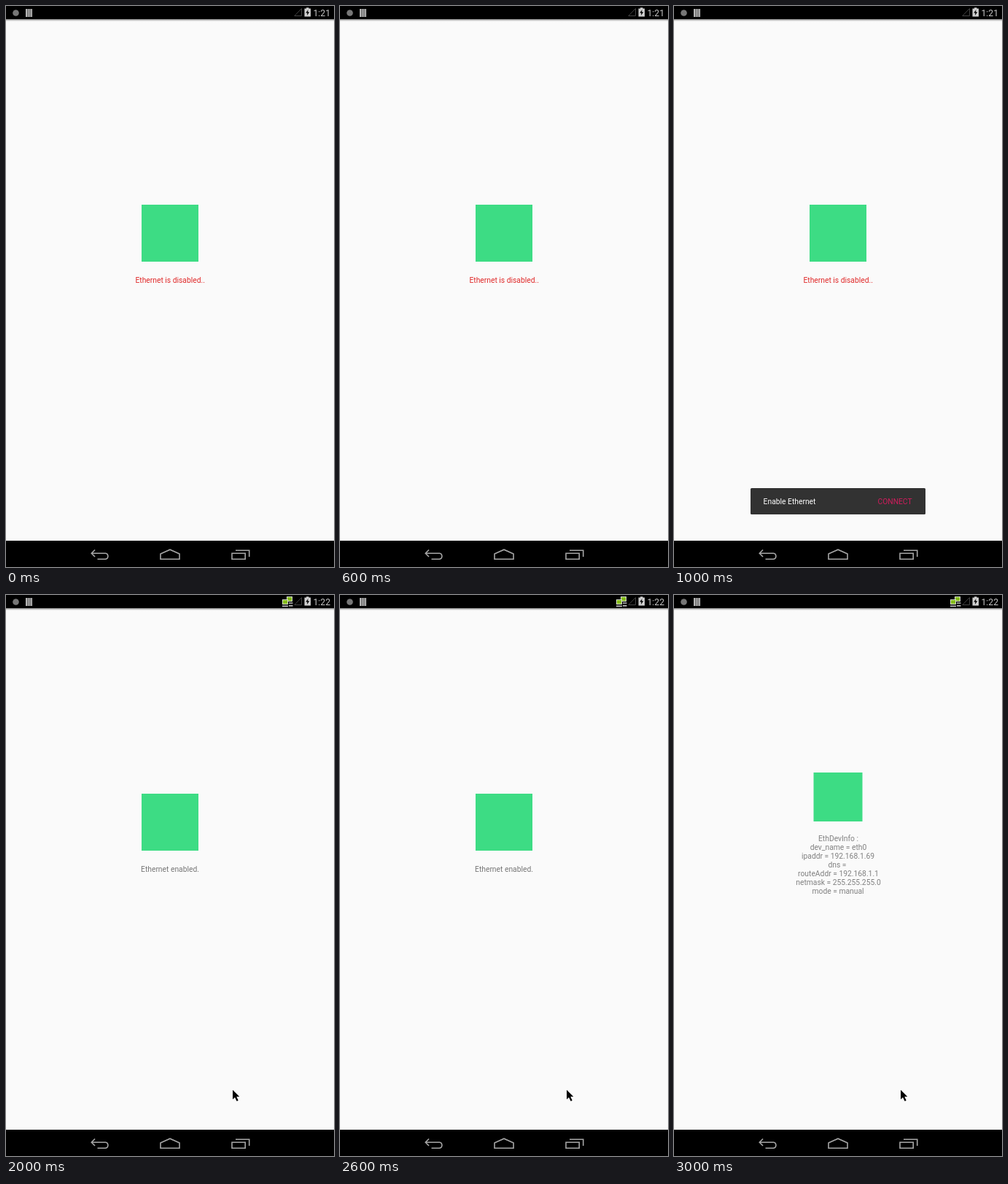
Write an HTML page that moves like this. It is 450 px wide and 768 px high and loops after 4 s.

```html
<!DOCTYPE html>
<html lang="en">
<head>
<meta charset="utf-8">
<title>Ethernet setup</title>
<style>
html, body { margin: 0; width: 100%; height: 100%; overflow: hidden; background: #fafafa; }
svg { display: block; }
text { font-family: Roboto, "Noto Sans", sans-serif; font-size: 10.3px; }
.mid { text-anchor: middle; }
.step { visibility: hidden; animation: 4s step-end infinite; }
.off { animation-name: off; }
.early { animation-name: early; }
.ask { animation-name: ask; }
.on { animation-name: on; }
.late { animation-name: late; }
.info { animation-name: info; }
.logo { animation: logo 4s step-end infinite; }
@keyframes off { 0% { visibility: visible; } 50%, 100% { visibility: hidden; } }
@keyframes early { 0% { visibility: visible; } 75%, 100% { visibility: hidden; } }
@keyframes ask { 0% { visibility: hidden; } 25% { visibility: visible; } 50%, 100% { visibility: hidden; } }
@keyframes on { 0% { visibility: hidden; } 50% { visibility: visible; } 75%, 100% { visibility: hidden; } }
@keyframes late { 0% { visibility: hidden; } 50%, 100% { visibility: visible; } }
@keyframes info { 0% { visibility: hidden; } 75%, 100% { visibility: visible; } }
</style>
</head>
<body>
<svg width="450" height="768" viewBox="0 0 450 768">
  <defs>
    <linearGradient id="shade" x2="0" y2="1">
      <stop stop-color="#8c8c8c"/>
      <stop offset="1" stop-color="#fafafa"/>
    </linearGradient>
  </defs>
  <rect width="450" height="768" fill="#fafafa"/>
  <rect y="18" width="450" height="3" fill="url(#shade)"/>

  <!-- status bar -->
  <rect width="450" height="18" fill="#000"/>
  <circle cx="13.5" cy="9.5" r="4.3" fill="#777"/>
  <rect x="27" y="4" width="9" height="11" fill="#b9b9b9"/>
  <path d="M29.5 4V15M31.7 4V15M33.9 4V15" stroke="#333" stroke-width=".7"/>
  <path d="M405.5 3.5V13.5H395.8Z" fill="none" stroke="#444"/>
  <path d="M409.5 3.5H412V2.3H415.5V3.5H418V14.5H409.5Z" fill="#cfcfcf"/>
  <path d="M414.5 5L411.2 9.6H413.4L412.9 13L416.3 8.2H414Z" fill="#000"/>
  <g class="step late">
    <rect x="385.5" y="2.5" width="7" height="6" fill="#86bd1c" stroke="#d4dcc8"/>
    <path d="M388 11H393.5" stroke="#ccc" stroke-width="1.4"/>
    <rect x="379.5" y="6.5" width="7" height="6" fill="#86bd1c" stroke="#d4dcc8"/>
    <path d="M379 15.2H387M388 14.8H393.5" stroke="#ccc" stroke-width="1.5"/>
  </g>
  <g fill="#c4c4c4">
    <text class="step off" x="421.5" y="14" style="font-size:12.2px">1:21</text>
    <text class="step late" x="421.5" y="14" style="font-size:12.2px">1:22</text>
  </g>

  <!-- content -->
  <rect class="step early" x="186" y="272" width="78" height="78" fill="#3ddc84"/>
  <rect class="step info" x="191.5" y="243" width="67" height="67" fill="#3ddc84"/>
  <text class="mid step off" x="225.2" y="379" fill="#e02a2a">Ethernet is disabled..</text>
  <text class="mid step on" x="225" y="379" fill="#777">Ethernet enabled.</text>
  <g class="mid step info" fill="#808080">
    <text x="225.5" y="337">EthDevInfo :</text>
    <text x="225.5" y="349">dev_name = eth0</text>
    <text x="225" y="361">ipaddr = 192.168.1.69</text>
    <text x="224" y="373">dns =</text>
    <text x="225.5" y="385">routeAddr = 192.168.1.1</text>
    <text x="225.5" y="397">netmask = 255.255.255.0</text>
    <text x="225" y="409">mode = manual</text>
  </g>

  <!-- snackbar -->
  <g class="step ask">
    <rect x="105" y="660" width="240" height="36" rx="1.5" fill="#323232"/>
    <text x="122.6" y="682" fill="#fff">Enable Ethernet</text>
    <text x="279.5" y="682" fill="#d01c5c">CONNECT</text>
  </g>

  <!-- pointer -->
  <path class="step late" d="M311 677.5V690.5L314 687.8L316.6 693L318.7 692L316.3 686.8H320.3Z"
        fill="#000" stroke="#fff" stroke-width="1.4" paint-order="stroke"/>

  <!-- navigation bar -->
  <rect y="732" width="450" height="36" fill="#000"/>
  <g fill="none" stroke="#a6a6a6" stroke-width="1.6">
    <path d="M122 744.5L117.3 749.3L122 754M117.5 749.3H136.5A4 4 0 0 1 136.5 757.2H125.5"/>
    <path d="M212 757.2V750L225 744.2L238 750V757.2Z"/>
    <path d="M310 749.3H328.2V757.2H310ZM315 745.3H333.7V754"/>
  </g>
</svg>
</body>
</html>
```
